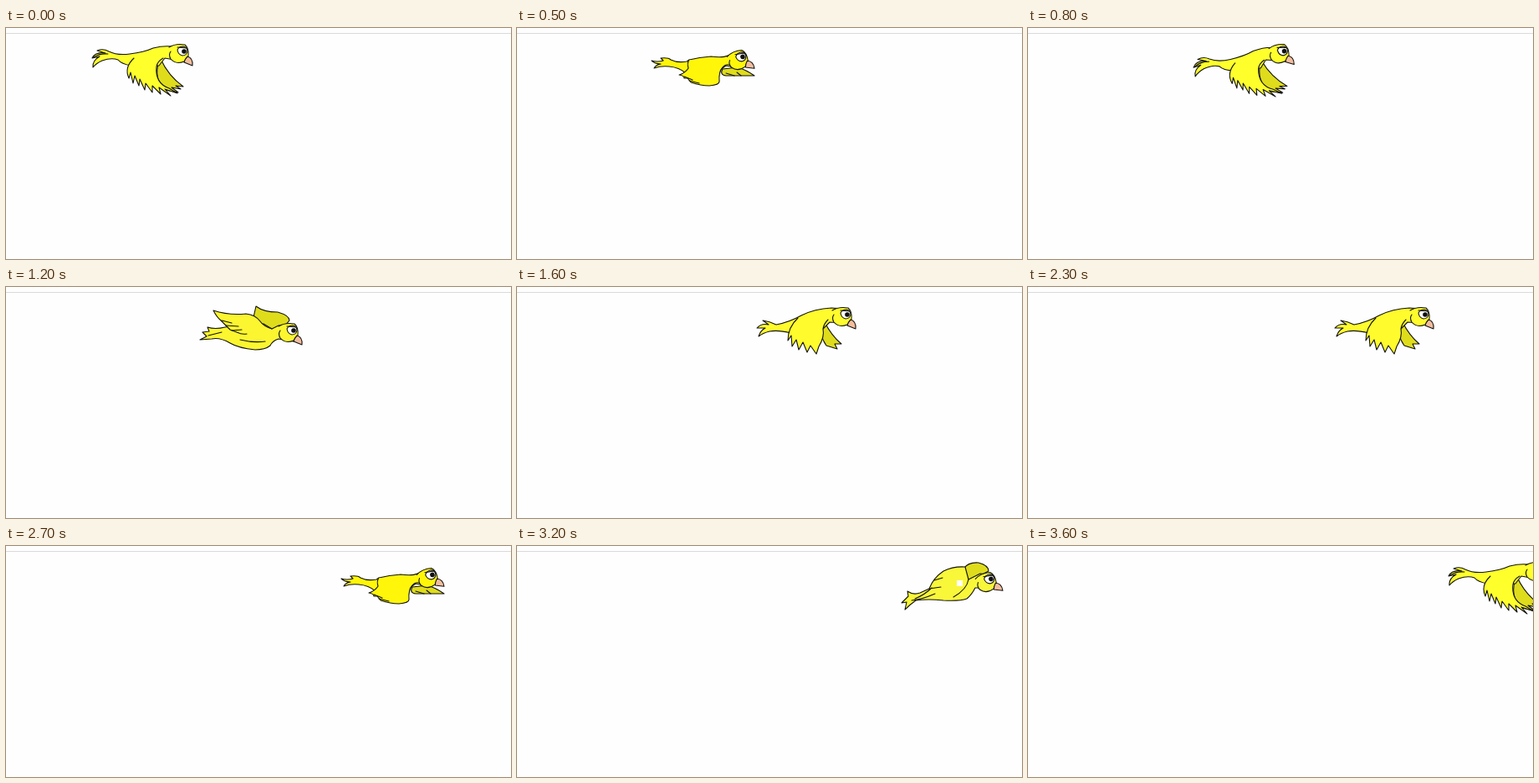
Animation, 604 px wide and 276 px high, one loop 3700 ms. Source, as an HTML page with a canvas:

```html
<!DOCTYPE html>
<html>
<head>
<meta charset="utf-8">
<style>
html, body { margin: 0; width: 100%; height: 100%; overflow: hidden; background: #fefefe; }
canvas { display: block; }
</style>
</head>
<body>
<canvas id="stage" width="604" height="276"></canvas>
<script>
const ctx = document.getElementById('stage').getContext('2d');
const FRAME = 100, FRAMES = 37, STRIDE = 10;

// One wing beat; head is [eye x, eye y, tilt in degrees]
const down = {
  head: [211, 28, 0], color: '#ffff2c',
  far: 'M185,37Q194,57 212,70L203,69 209,73 198,71 206,77 190,74Q176,60 183,40Z',
  body: 'M104,47Q103,39 112,34L103,36Q107,28 119,30L109,27Q116,24 123,28Q133,33 148,31Q165,29 176,24Q188,21 198,22L212,22 213,40 190,36Q186,41 183,45L150,45Q138,43 134,38Q126,35 115,39Q108,42 104,47Z',
  wing: 'M153,36Q141,47 147,60L149,53 152,66 154,57 159,69 160,61 166,74 167,66 175,77 175,69 185,79 183,71 197,81 190,73 205,78 195,72Q178,66 180,46Q181,40 188,36',
  lines: 'M105,35Q112,30 122,31'
};
const poses = [
  down,
  { ...down, tilt: -6, shift: 4 },
  {
    head: [213, 33, 0], color: '#fffb2c',
    far: 'M188,42Q196,58 208,68L200,68 203,74 190,70Q180,56 186,42Z',
    body: 'M109,59Q111,52 117,49L107,49Q112,43 121,45L114,40Q122,41 130,45Q146,42 160,34Q176,26 196,25L213,26 212,43 194,42Q188,48 184,52Q160,58 148,55Q132,51 122,53Q114,55 109,59Z',
    wing: 'M156,37Q144,48 144,64L148,58 149,71 154,63 157,75 162,66 167,78 171,70 178,80 181,71Q188,60 186,50Q187,44 192,39'
  },
  {
    head: [212, 36, -8], color: '#fbf834',
    far: 'M190,44Q196,56 210,62Q214,56 208,46Z',
    body: 'M112,70L116,63 108,61 118,58 114,51Q122,55 130,54Q145,48 160,38Q178,27 196,27L212,28 210,46 195,48Q190,60 172,64Q150,66 128,62Q118,64 112,70Z',
    wing: 'M160,38Q146,50 142,66L150,63 150,72 159,68 162,75 170,70Q184,66 186,54Q187,46 192,42'
  },
  {
    head: [205, 40, -15], color: '#f9f73a', spot: true,
    far: 'M174,27Q180,19 192,20Q204,23 204,30Q192,37 180,41Z',
    body: 'M104,76L106,67 100,68 108,60 107,54Q114,59 122,56L133,51Q138,38 150,30Q162,24 176,25L180,40 194,33 206,34 206,50 188,50Q184,58 178,63Q170,66 150,65Q132,63 117,65Q110,70 104,76Z',
    lines: 'M112,65Q124,64 140,57M116,63Q128,58 136,50M133,51L147,49M139,41L149,38M180,40Q178,52 162,61'
  },
  {
    head: [212, 52, 0], color: '#fbf62f',
    far: 'M166,36L169,23Q178,30 195,30Q209,34 209,40Q204,48 188,51L176,48Z',
    body: 'M102,63L110,59 105,54 113,53 111,48Q120,51 132,48L150,46 178,44 188,50Q190,49 196,46L214,45 214,65 196,62Q189,64 186,70Q180,75 168,75Q148,73 138,67Q126,60 116,62Z',
    wing: 'M188,50Q178,47 174,41Q168,33 157,32Q136,34 118,28Q122,36 127,40L132,45 138,51 146,54Q152,57 158,56',
    lines: 'M128,40L140,43M133,46L148,47M140,52L152,51M112,58L128,54M150,63Q166,67 180,65'
  },
  {
    head: [208, 35, -15], color: '#fff60a',
    far: 'M186,49Q182,56 190,57L224,57Q214,50 204,47Z',
    body: 'M104,48Q106,44 112,43Q105,43 101,39Q108,41 115,39L112,36Q121,35 124,38Q132,42 143,40L146,38Q158,35 172,34Q186,36 192,33L206,29 208,48 190,45 180,52 142,54Q134,47 122,46Q112,45 104,48Z',
    wing: 'M146,38Q143,42 145,48Q141,54 134,56Q140,57 140,60L144,60 148,65Q160,69 170,69Q182,68 182,64Q181,52 186,47Q189,43 195,44',
    lines: 'M140,58L150,62M146,63L158,66M190,54L200,57M203,53L208,57'
  },
  {
    head: [215, 29, -5], color: '#fffa1c',
    far: 'M190,42Q200,58 222,66L212,67 206,66 196,66Q188,60 188,44Z',
    body: 'M108,48Q108,42 115,39L106,38Q112,34 120,35L114,31Q121,31 127,34Q137,37 150,34Q166,31 180,27Q190,25 200,22L215,22 215,42 194,38Q190,44 186,48L150,48Q138,44 132,41Q118,42 108,48Z',
    wing: 'M150,37Q143,48 138,58L146,57 144,66 152,63 152,72 160,68 163,77 170,72 177,79Q188,74 186,58Q187,46 193,40'
  }
];

function shape(d, fill) {
  if (!d) return;
  const path = new Path2D(d);
  if (fill) {
    ctx.fillStyle = fill;
    ctx.fill(path);
  }
  ctx.stroke(path);
}

function drawHead([x, y, tilt], color) {
  ctx.save();
  ctx.translate(x, y);
  ctx.rotate(tilt * Math.PI / 180);
  shape('M-16,-5Q-8,-10 3,-8Q8,-4 7,6L2,12Q-8,16 -14,9Q-17,4 -14,0', color);
  shape('M6,6Q13,8 12,17L2,13Q3,9 6,6Z', '#f3bd9c');
  shape('M-6,-2Q-4,-6 1,-6Q6,-5 6,0Q5,5 0,5Q-5,4 -6,-2Z', '#fff');
  ctx.fillStyle = '#111';
  ctx.beginPath();
  ctx.arc(2, 0, 2.8, 0, 7);
  ctx.fill();
  shape('M-6,-5L5,-4');
  ctx.restore();
}

function drawBird(pose) {
  if (pose.tilt) {
    ctx.translate(200 + pose.shift, 33);
    ctx.rotate(pose.tilt * Math.PI / 180);
    ctx.translate(-200, -32);
  }
  shape(pose.far, '#dfdc1c');
  shape(pose.body, pose.color);
  shape(pose.wing, pose.color);
  shape(pose.lines);
  if (pose.spot) {
    ctx.fillStyle = '#fff';
    ctx.fillRect(166, 41, 7, 7);
  }
  drawHead(pose.head, pose.color);
}

function render(now) {
  const frame = Math.floor(now / FRAME) % FRAMES;
  const step = Math.round(frame * 10 / 9); // 41 steps thinned to 37
  ctx.fillStyle = '#fefefe';
  ctx.fillRect(0, 0, 604, 276);
  ctx.fillStyle = '#dadada';
  ctx.fillRect(0, 6, 604, 1);
  ctx.save();
  ctx.strokeStyle = '#111';
  ctx.lineWidth = 1.1;
  ctx.lineJoin = ctx.lineCap = 'round';
  ctx.translate(step * STRIDE, 0);
  drawBird(poses[step % poses.length]);
  ctx.restore();
}

const start = performance.now();
function tick() {
  render(performance.now() - start);
  requestAnimationFrame(tick);
}
tick();
</script>
</body>
</html>
```
